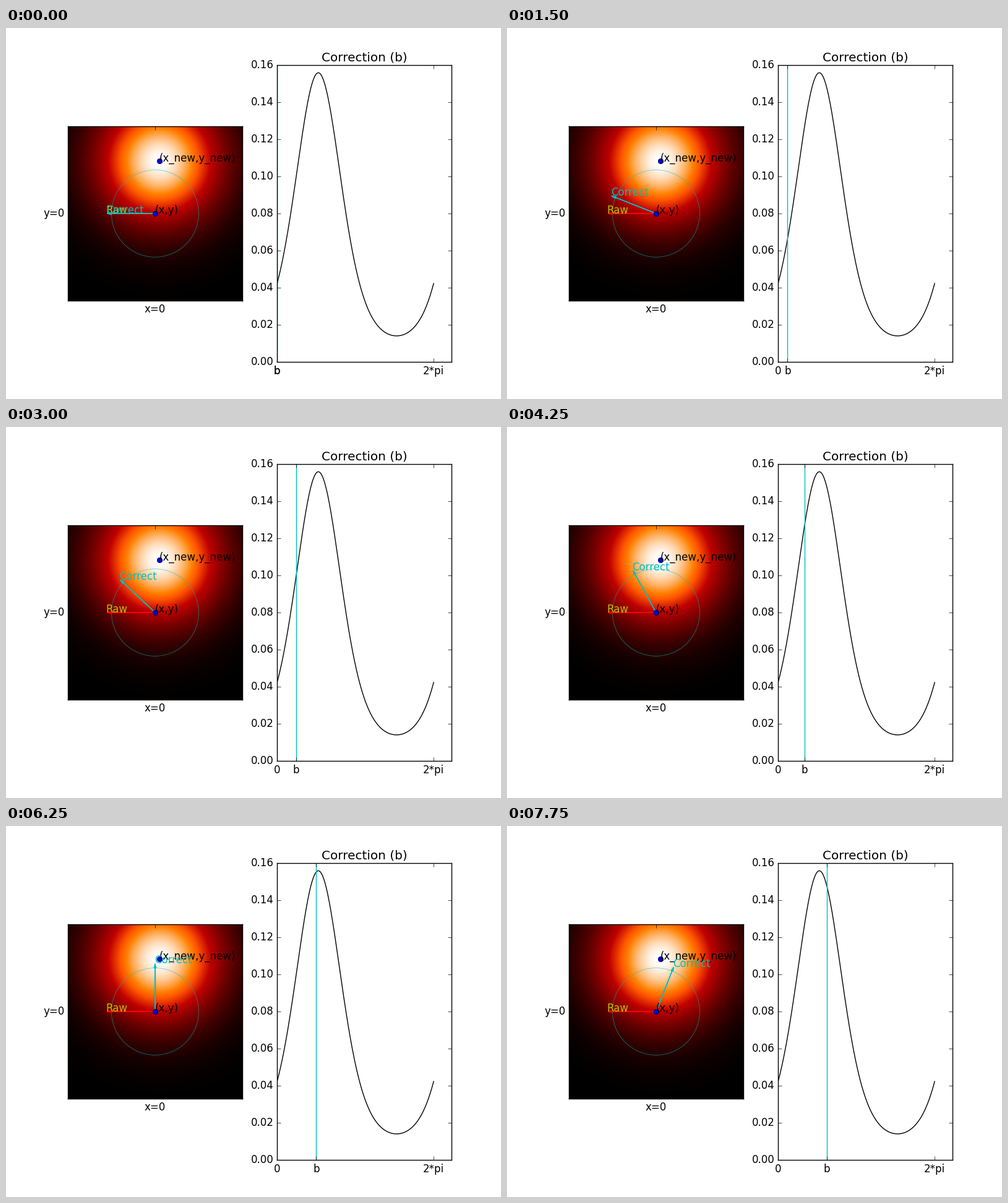
A matplotlib script for the animation above (8000 ms loop, 800 px wide and 600 px high).

```python
import numpy as np
import matplotlib.pyplot as plt
from matplotlib.animation import FuncAnimation

plt.style.use("classic")

STEPS = 32
TURN = 2 * np.pi
PEAK = (0.1, 1.2)
SHAFT, HEAD = 1.0, 0.1
REACH = SHAFT + HEAD


def density(x, y):
    """Unit normal distribution centred on PEAK."""
    d2 = (x - PEAK[0]) ** 2 + (y - PEAK[1]) ** 2
    return np.exp(-d2 / 2) / TURN


def heading(b):
    """Direction that starts at the left and turns clockwise."""
    return -np.cos(b), np.sin(b)


def add_arrow(ax, b, color):
    dx, dy = heading(b)
    return ax.arrow(0, 0, SHAFT * dx, SHAFT * dy, head_width=0.05,
                    head_length=HEAD, color=color)


fig = plt.figure(figsize=(8, 6), dpi=100, facecolor="white")
field = fig.add_subplot(1, 2, 1)
graph = fig.add_subplot(1, 2, 2)

# Left: heat map with the two positions and the directions
grid = np.linspace(-2, 2, 400)
field.imshow(density(*np.meshgrid(grid, grid)), extent=(-2, 2, -2, 2),
             origin="lower", cmap="gist_heat", interpolation="bilinear")
field.set_xticks([0], ["x=0"])
field.set_yticks([0], ["y=0"])
field.add_patch(plt.Circle((0, 0), 1, fill=False, ec="c", lw=0.5, alpha=0.7))
field.plot([0, PEAK[0]], [0, PEAK[1]], "bo")
field.text(0, 0, "(x,y)")
field.text(*PEAK, "(x_new,y_new)")
add_arrow(field, 0, "r")
field.text(-REACH - 0.03, 0, "Raw", color="y")
label = field.text(0, 0, "Correct", color="c")
field.set(xlim=(-2, 2), ylim=(-2, 2))

# Right: density along the circle
angles = np.linspace(0, TURN, 300)
graph.plot(angles, density(*heading(angles)), "k")
marker = graph.axvline(0, color="c")
graph.set(xlim=(0, 7), ylim=(0, 0.16), title="Correction (b)")

arrow = add_arrow(field, 0, "c")


def draw(step):
    global arrow
    b = TURN * step / 100
    arrow.remove()
    arrow = add_arrow(field, b, "c")
    dx, dy = heading(b)
    label.set_position((REACH * dx - 0.015, REACH * dy))
    marker.set_xdata([b, b])
    graph.set_xticks([0, b, TURN], ["0", "b", "2*pi"])


anim = FuncAnimation(fig, draw, frames=STEPS, interval=250, repeat=True,
                     repeat_delay=0, init_func=lambda: draw(0))
plt.show()
```
